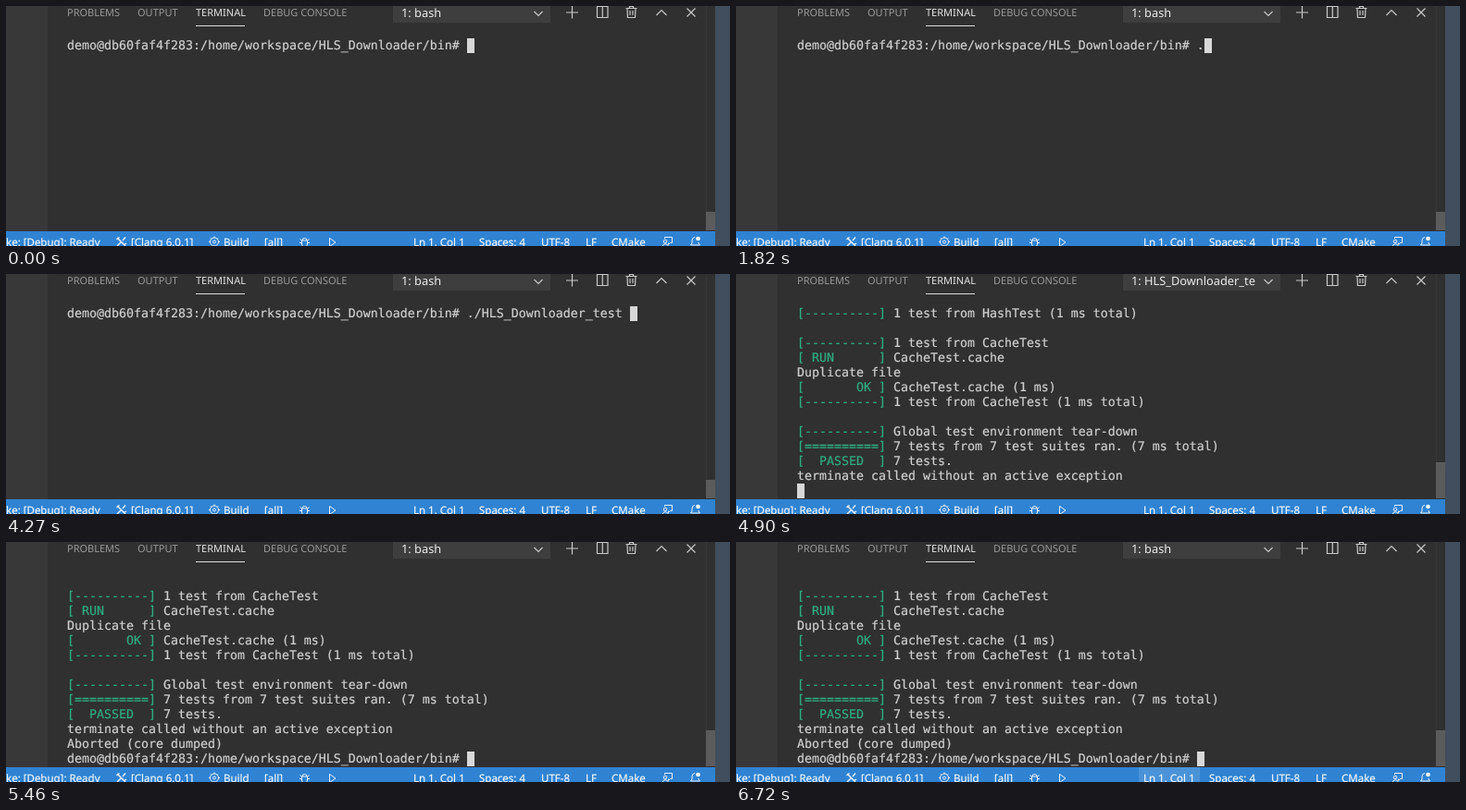
These frames come from a looping animation (782 by 260 pixels, 6.79 s). An HTML page:

```html
<!DOCTYPE html>
<html lang="en">
<head>
<meta charset="utf-8">
<title>Terminal test run</title>
<style>
  html, body { margin: 0; width: 100%; height: 100%; overflow: hidden; background: #303030; }
  svg { display: block; }
  text { white-space: pre; text-rendering: geometricPrecision; }
  .tabs { font: 11px "Noto Sans", sans-serif; fill: #989898; }
  .tabs .on { fill: #e4e4e4; }
  .pick { font: 12.8px "Noto Sans", sans-serif; fill: #ececec; }
  .status { font: 11.5px "Noto Sans", sans-serif; fill: #eef5fc; }
  .status text { stroke: #eef5fc; stroke-width: .2; }
  .term { font: 13.29px "DejaVu Sans Mono", monospace; fill: #d0d0d0; stroke: #d0d0d0; stroke-width: .2; }
  .tag { fill: #2fab82; stroke: #2fab82; }
  .line { fill: none; stroke: #c8c8c8; stroke-width: 1.2; }
  .status .line { stroke: #e6f0fa; stroke-width: 1; }
  .hover { fill: #fff; opacity: 0; animation: hover 6790ms step-end infinite; }
  @keyframes hover { 0% { opacity: 0; } 94.8% { opacity: .13; } }
</style>
</head>
<body>
<svg width="782" height="260" viewBox="0 0 782 260">
  <rect width="782" height="260" fill="#303030"/>
  <rect width="45" height="246" fill="#383838"/>
  <rect x="766" width="16" height="260" fill="#414e5d"/>
  <rect x="756" width="1" height="244" fill="#373737"/>
  <rect id="thumb" x="756" width="10" fill="#5b5b5b"/>

  <g class="tabs">
    <text x="66" y="11">PROBLEMS</text>
    <text x="142" y="11">OUTPUT</text>
    <text x="205" y="11" class="on">TERMINAL</text>
    <text x="278" y="11">DEBUG CONSOLE</text>
    <rect x="205" y="21" width="53" height="1" fill="#dcdcdc"/>
  </g>

  <rect x="418" y="-4" width="170" height="22" fill="#3e3e3e"/>
  <text id="pick" class="pick" x="427" y="11.5"></text>
  <g class="line">
    <path d="M570.5 6l4.5 4.5 4.5-4.5"/>
    <path d="M605 7h13M611.5 0v13.5"/>
    <path d="M638.5 .5h11.5v12h-11.5zM644.3 .5v12"/>
    <path d="M669.5 2.5h12M673.5 2.5v-2h4v2M671 2.5l.5 10h8l.5-10M674 5v5M677 5v5"/>
    <path d="M702.5 10l5.5-5.5 5.5 5.5"/>
    <path d="M735.5 2.5l9 9M744.5 2.5l-9 9"/>
  </g>

  <g id="term" class="term"></g>
  <rect id="cursor" width="8" height="16" fill="#d8d8d8"/>

  <g class="status">
    <rect y="244" width="766" height="16" fill="#2f83d2"/>
    <rect class="hover" x="435" y="244" width="66" height="16"/>
    <text x="0" y="259.5">ke: [Debug]: Ready</text>
    <text x="135" y="259.5">[Clang 6.0.1]</text>
    <text x="235" y="259.5">Build</text>
    <text x="279" y="259.5">[all]</text>
    <text x="440" y="259.5">Ln 1, Col 1</text>
    <text x="511" y="259.5">Spaces: 4</text>
    <text x="578" y="259.5">UTF-8</text>
    <text x="626" y="259.5">LF</text>
    <text x="654" y="259.5">CMake</text>
    <g class="line">
      <path d="M120 251l9 9M120 260l4-4M126 254l3-3.5M119.5 253l3-2.5M127 259l3-2" stroke-width="1.5"/>
      <circle cx="225" cy="255.5" r="4.5"/>
      <circle cx="225" cy="255.5" r="1.5"/>
      <path d="M225 249.5v2M225 259.5v2M219 255.5h2M229 255.5h2M220.8 251.3l1.3 1.3M229.2 251.3l-1.3 1.3"/>
      <path d="M319.5 254h6v4a3 3 0 0 1-6 0zM320 254a2.5 2.5 0 0 1 5 0M317 256.5h2.5M325.5 256.5h2.5M317.5 252.5l2 1.5M327.5 252.5l-2 1.5"/>
      <path d="M349.5 251.5l6.5 4.5-6.5 4.5z"/>
      <path d="M711.5 252v-1.5h8v6h-2l-2 2v-2M709 260.5a3.3 3.3 0 0 1 6.5 0"/>
      <circle cx="712" cy="255" r="1.8"/>
      <path d="M744 250.5a3.5 3.5 0 0 0-3 3.5v3l-1.5 2h10l-1.5-2v-1M743.5 260.5h2"/>
    </g>
    <circle cx="747.5" cy="252" r="2.3" fill="#fff"/>
  </g>
</svg>
<script>
const LOOP = 6790, LEFT = 66, TOP = 34, CELL = 8, ROW = 16, ROWS = 13;
const prompt = "demo@db60faf4f283:/home/workspace/HLS_Downloader/bin# ";
const typed = [
  [0, ""], [1610, "."], [2660, "./"], [2870, "./H"], [3010, "./HLS_Downloader"],
  [3570, "./HLS_Downloader_"], [3780, "./HLS_Downloader_test "]
];
const titles = [[0, "1: bash"], [4900, "1: HLS_Downloader_te"], [5460, "1: bash"]];
const RUN_AT = 4830, ABORT_AT = 5460;
const dashes = "[----------]";
const output = [
  dashes + " 1 test from HashTest (1 ms total)",
  "",
  dashes + " 1 test from CacheTest",
  "[ RUN      ] CacheTest.cache",
  "Duplicate file",
  "[       OK ] CacheTest.cache (1 ms)",
  dashes + " 1 test from CacheTest (1 ms total)",
  "",
  dashes + " Global test environment tear-down",
  "[==========] 7 tests from 7 test suites ran. (7 ms total)",
  "[  PASSED  ] 7 tests.",
  "terminate called without an active exception"
];

const $ = id => document.getElementById(id);
const latest = (steps, t) => steps.filter(s => s[0] <= t).pop()[1];
const markup = (line, i) => {
  const body = line.replace(/^\[.{10}\]/, '<tspan class="tag">$&</tspan>');
  return `<text x="${LEFT}" y="${TOP + 13 + i * ROW}">${body}</text>`;
};

function screen(t) {
  if (t < RUN_AT) return [prompt + latest(typed, t)];
  const tail = t < ABORT_AT ? [""] : ["Aborted (core dumped)", prompt];
  return [...output, ...tail].slice(-ROWS);
}

let shown = "";
function draw() {
  const t = performance.now() % LOOP;
  const lines = screen(t), title = latest(titles, t);
  const key = title + lines.join("\n");
  if (key !== shown) {
    shown = key;
    const last = lines.length - 1, thumbTop = t < RUN_AT ? 223 : 204;
    $("term").innerHTML = lines.map(markup).join("");
    $("pick").textContent = title;
    $("cursor").setAttribute("x", LEFT + lines[last].length * CELL);
    $("cursor").setAttribute("y", TOP + 1 + last * ROW);
    $("thumb").setAttribute("y", thumbTop);
    $("thumb").setAttribute("height", 243 - thumbTop);
  }
  requestAnimationFrame(draw);
}
draw();
</script>
</body>
</html>
```
